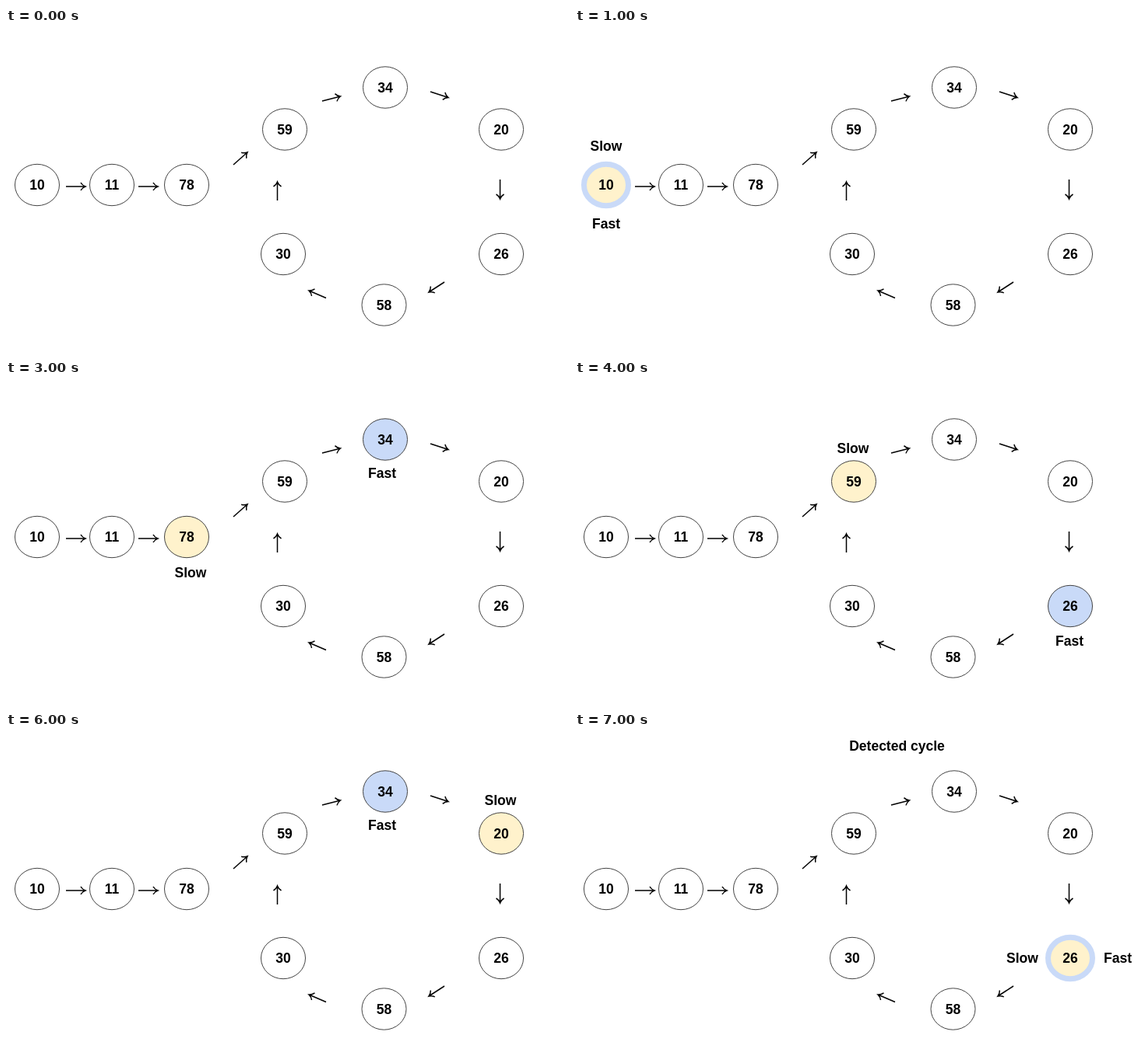
Animation of 723x417 px, one loop 8 s. Source, as an HTML page:

```html
<!DOCTYPE html>
<html lang="en">
<head>
<meta charset="utf-8">
<title>Slow and fast pointers</title>
<style>
  html, body { margin: 0; width: 100%; height: 100%; overflow: hidden; background: #fff; }
  svg { display: block; width: 723px; height: 417px; }
  ellipse { fill: #fff; stroke: #434343; stroke-width: 1; }
  .slow { fill: #fff2cc; }
  .fast { fill: #c9daf8; }
  .slow.fast { fill: #fff2cc; stroke: #c9daf8; stroke-width: 7; }
  path { fill: none; stroke: #000; stroke-width: 1.5; }
  text { font: bold 17.5px "Liberation Sans", Arial, sans-serif; text-anchor: middle; }
</style>
</head>
<body>
<svg viewBox="0 0 723 417"></svg>
<script>
const svg = document.querySelector('svg');

// value: centre
const nodes = {
  10: [40, 202], 11: [136, 202], 78: [232, 202], 59: [358, 130.5], 34: [487, 76.5],
  20: [636, 130.5], 26: [636, 291], 58: [485.5, 356.5], 30: [356, 291]
};

// tail x, y, tip x, y
const arrows = [
  [77, 204, 102, 204], [170, 204, 195, 204], [292, 176, 310, 160],
  [406, 94, 429.5, 88], [545, 82, 568, 89.5], [634.5, 195, 634.5, 220],
  [563, 327, 543, 340], [411, 347.5, 389, 338], [348.5, 222, 348.5, 198]
];

// each pointer: node value, label x, label y
const steps = [
  {},
  { slow: [10, 40, 152], fast: [10, 40, 252] },
  { slow: [11, 132.5, 251.5], fast: [78, 235.5, 251.5] },
  { slow: [78, 237, 247.5], fast: [34, 483, 119.5] },
  { slow: [59, 357, 87.5], fast: [26, 635, 336] },
  { slow: [34, 485, 31.5], fast: [30, 355, 247.5] },
  { slow: [20, 635, 87.5], fast: [34, 483, 119.5] },
  { slow: [26, 574.5, 290.5], fast: [26, 697, 290.5], note: 'Detected cycle' }
];

function add(tag, attrs, text = '') {
  const el = document.createElementNS(svg.namespaceURI, tag);
  for (const key in attrs) el.setAttribute(key, attrs[key]);
  el.textContent = text;
  return svg.appendChild(el);
}

function place(el, x, y) {
  el.setAttribute('x', x);
  el.setAttribute('y', y + 6.3);
}

const ovals = {};
for (const value in nodes) {
  const [cx, cy] = nodes[value];
  ovals[value] = add('ellipse', { cx, cy, rx: 28.5, ry: 26.7 });
  place(add('text', {}, value), cx, cy);
}

for (const [x1, y1, x2, y2] of arrows) {
  const length = Math.hypot(x2 - x1, y2 - y1);
  const angle = Math.atan2(y2 - y1, x2 - x1) * 180 / Math.PI;
  add('path', {
    d: `M${-length} 0H0M-6 -5Q-4 -1.5 0 0Q-4 1.5 -6 5`,
    transform: `translate(${x2} ${y2}) rotate(${angle})`
  });
}

const labels = { slow: add('text', {}), fast: add('text', {}) };
const note = add('text', {});
place(note, 413.5, 17.5);

let shown = -1;
function draw(now) {
  const index = Math.floor(now % 8000 / 1000);
  if (index !== shown) {
    shown = index;
    const step = steps[index];
    for (const value in ovals) ovals[value].setAttribute('class', '');
    for (const name in labels) {
      labels[name].textContent = '';
      if (!step[name]) continue;
      const [value, x, y] = step[name];
      ovals[value].classList.add(name);
      labels[name].textContent = name === 'slow' ? 'Slow' : 'Fast';
      place(labels[name], x, y);
    }
    note.textContent = step.note || '';
  }
  requestAnimationFrame(() => draw(performance.now()));
}
draw(performance.now());
</script>
</body>
</html>
```
